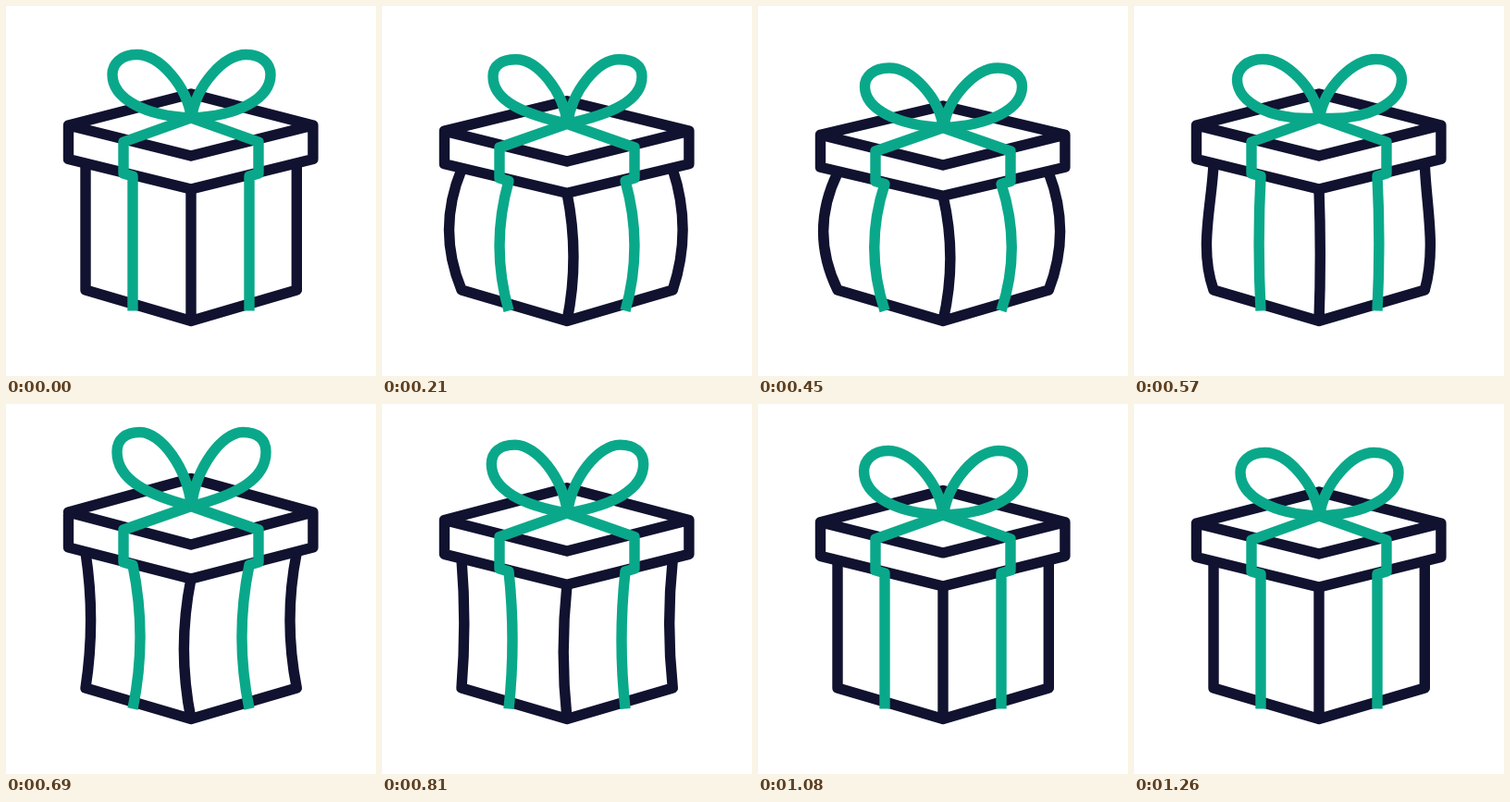
An HTML page for the animation above (1.32 s loop, 400 by 400 pixels).

```html
<!DOCTYPE html>
<html lang="en">
<head>
<meta charset="utf-8">
<title>Gift box</title>
<style>
  html, body { margin: 0; width: 100%; height: 100%; overflow: hidden; background: #fff; }
  svg { display: block; width: 100%; height: 100%; }
  path { fill: none; stroke-width: 11.4; stroke-linejoin: round; }
  .box { stroke: #10122f; stroke-linecap: round; }
  .lid { fill: #fff; }
  .ribbon { stroke: #0aa88a; }
</style>
</head>
<body>
<svg viewBox="0 0 400 400">
  <path id="body" class="box"/>
  <path id="lid" class="box lid"/>
  <path id="ribbon" class="ribbon"/>
  <path id="bow" class="ribbon"/>
</svg>
<script>
const LOOP = 1320, STEP = 30, LAST = 1260;

// time, lid drop, upper and lower side bulge, inner bulge, bow width, bow height
const poses = [
  [0, 0, 0, 0, 0, 85.5, 68.5],
  [210, 6, 18, 18, 13.3, 80.5, 69.5],
  [450, 10, 20.5, 20.5, 15, 85, 64.5],
  [570, 0, 2, 16, 2.5, 89, 63.5],
  [690, -10, -7.5, -7.5, -10.7, 80.5, 80],
  [930, 4, 0, 0, 0, 84.5, 67.5],
  [1110, -1.5, 0, 0, 0, 86, 69.5],
  [1260, 0, 0, 0, 0, 85.5, 68.5]
];

const slope = (i, k) =>
  (poses[i + 1][k] - poses[i][k]) / (poses[i + 1][0] - poses[i][0]);

// Flat at turning points, so no pose is overshot
function tangent(i, k) {
  if (i === 0 || i === poses.length - 1) return 0;
  const a = slope(i - 1, k), b = slope(i, k);
  return a * b <= 0 ? 0 : 2 * a * b / (a + b);
}

function poseAt(t) {
  let i = 0;
  while (i < poses.length - 2 && t >= poses[i + 1][0]) i++;
  const [from, to] = [poses[i], poses[i + 1]];
  const span = to[0] - from[0], p = (t - from[0]) / span, q = 1 - p;
  return from.slice(1).map((v, n) => {
    const k = n + 1;
    return v * q * q * (1 + 2 * p) + to[k] * p * p * (3 - 2 * p) +
      span * p * q * (q * tangent(i, k) - p * tangent(i + 1, k));
  });
}

// Nearly upright line that bows sideways by two control offsets
const bent = (x, top, bottom, upper, lower) => {
  const third = (bottom - top) / 3;
  return `${x} ${top}C${x + upper} ${top + third} ${x + lower} ${bottom - third} ${x} ${bottom}`;
};

const setPath = (id, d) => document.getElementById(id).setAttribute('d', d);

function draw(t) {
  const [drop, upper, lower, inner, w, h] = poseAt(t);
  // Height that follows the lid, by one share downwards and another upwards
  const y = (base, down, up = down) => base + drop * (drop > 0 ? down : up);

  // The right side swells less and pinches more than the left
  const right = v => Math.min(v * .8, v * 1.3);
  const front = Math.min(inner * .7, inner * .95);
  const sideTop = y(171, .95, 1.05), frontLow = y(198, .72, .9);
  setPath('body',
    'M' + bent(86, sideTop, 307, -upper, -lower) + 'L200 340.5L314.3 307' +
    'M' + bent(314.3, sideTop, 307, right(upper), right(lower)) +
    'M' + bent(200, frontLow, 340.5, front, front));

  const corner = y(129, 1.02, 1.2), low = y(165.5, .88, 1.05);
  setPath('lid',
    `M67.5 ${corner}L200 ${y(95, 1.3, 1.45)}L331.9 ${corner}V${low}L200 ${frontLow}L67.5 ${low}Z` +
    `M67.5 ${corner}L200 ${y(162, 1)}L331.9 ${corner}`);

  const knot = y(121, 1.05), shoulder = y(147, 1, 1.1), hem = y(181, .85, 1);
  const strap = side => {
    const x = 200 + side * 73, inside = 200 + side * 63;
    return `M200 ${knot}L${x} ${shoulder}V${hem}L` +
      bent(inside, hem + 3, 329.5, side * inner, side * inner);
  };
  setPath('ribbon', strap(-1) + strap(1));

  // A narrow bow perks up and its loops lift off the lid
  const perk = 85 - w, tip = .69 + perk * .01, lift = .04 + perk * .025;
  const loop = side => {
    const at = (px, py) => `${200.5 + side * px * w} ${knot - py * h} `;
    return 'M' + at(0, 0) +
      'C' + at(.06, .52) + at(.41, 1) + at(.69, 1) +
      'C' + at(.89, 1) + at(1, tip + .17) + at(1, tip) +
      'C' + at(1, tip - .38) + at(.59, lift) + at(0, 0);
  };
  setPath('bow', loop(-1) + loop(1));
}

function tick() {
  const t = performance.now() % LOOP;
  draw(Math.min(LAST, Math.floor(t / STEP) * STEP));
  requestAnimationFrame(tick);
}
tick();
</script>
</body>
</html>
```
